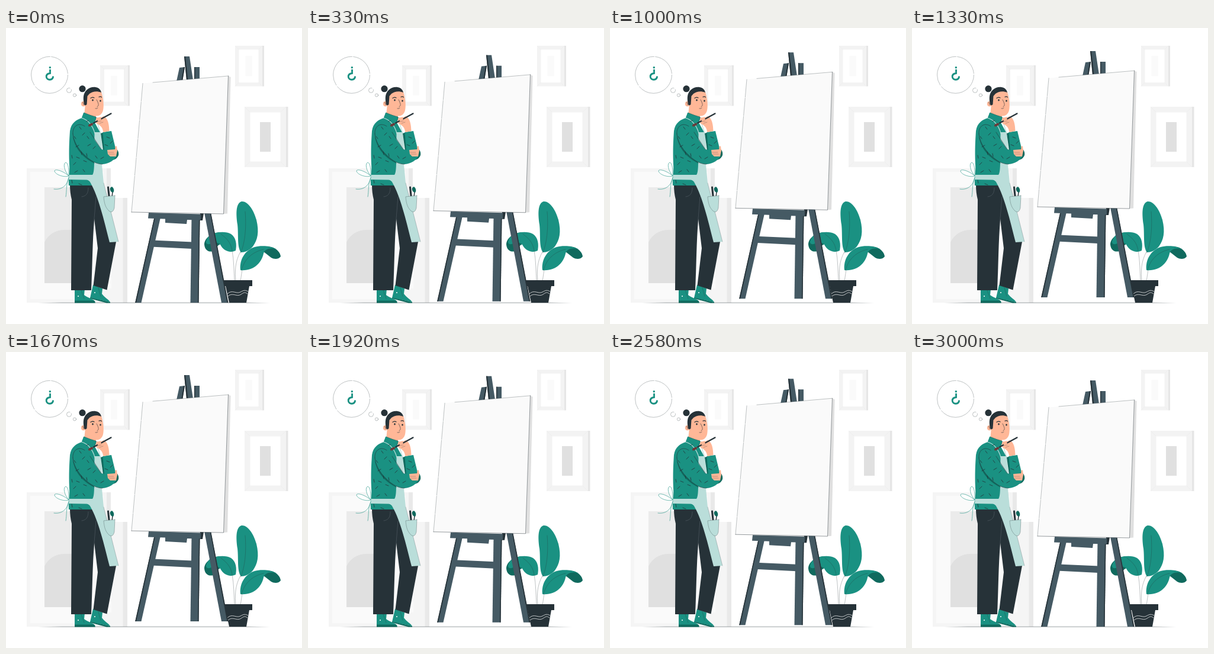
Animation, 500 px wide and 500 px high, one loop 3040 ms. Source, as an HTML page:

```html
<!DOCTYPE html>
<html lang="en">
<head>
<meta charset="utf-8">
<title>Artist at the easel</title>
<style>
html, body { margin: 0; width: 100%; height: 100%; overflow: hidden; background: #fff; }
svg { display: block; width: 100vw; height: 100vh; }
.teal { fill: #1a9182; }
.deep { fill: #106a5e; }
.ink { fill: #263238; }
.skin { fill: #ffb797; }
.mint { fill: #badeda; }
.slate { fill: #455a64; }
.line { fill: none; stroke: #263238; stroke-width: .6; stroke-linecap: round; stroke-linejoin: round; }
.faint { stroke-width: .5; stroke-opacity: .6; }
</style>
</head>
<body>
<svg viewBox="0 0 500 500">
  <g id="wall">
    <path fill="#f5f5f5" d="M35 237H171V464H35Z"/>
    <path fill="#e9e9e9" d="M170 237H177V464H170Z"/>
    <path fill="#fafafa" d="M41 243H165V458H41Z"/>
    <path fill="#ebebeb" d="M65 269H141V431H65Z"/>
    <path fill="#e0e0e0" d="M65 431V362C72 348 84 341 99 341H141V431Z"/>
    <path fill="#f5f5f5" d="M150 287H199V464H150Z"/>
    <path fill="#fafafa" d="M150 292H178V440H150Z"/>
    <path fill="#e9e9e9" d="M197.500 287H205V464H197.500Z"/>
  </g>

  <path fill="#263238" opacity=".6" d="M54 464.200L95 463.800H405L446 464.200L405 464.600H95Z"/>

  <g id="plant">
    <path class="line faint" d="M396 378C386 396 387 412 388 428M382 376C385 392 385 410 386 428M399 408L396 428"/>
    <path class="teal" d="M397 379C390 370 393 350 391 332C389 318 387 296 398 293C407 292 418 305 423 324C428 345 425 358 417 369C411 376 403 379 397 379Z"/>
    <path class="deep" d="M360 345C345 347 335 356 335 366C336 376 343 379 350 377C357 375 356 366 361 366Z"/>
    <path class="teal" d="M344 350C356 344 371 343 380 348C389 354 390 366 388 376C378 381 367 376 362 366C358 361 350 362 344 365C337 366 335 361 344 350Z"/>
    <path class="deep" d="M436 369C452 367 463 377 464 386C459 392 452 390 448 388L434 377Z"/>
    <path class="teal" d="M396 409C394 391 404 375 420 370C433 366 449 369 458 374C447 370 437 373 435 381C432 396 419 411 396 409Z"/>
    <path class="line faint" d="M404 310C407 346 401 371 396 380M363 348C377 358 381 367 382 377M435 374C416 378 402 391 398 409"/>
    <path class="ink" d="M367 426H416V436H367ZM371 436H411L406 464H377Z"/>
    <path fill="none" stroke="#fff" stroke-width=".7" d="M374 449C382 441 389 450 396 446S404 443 409 445M375 453C383 446 390 455 397 450S404 447 408 449"/>
  </g>

  <g id="easel">
    <g class="slate">
      <path d="M293 67L302 66L298 90H288ZM318 66H327V90H318Z"/>
      <path d="M301 48L310 48L316 88H305Z"/>
      <path d="M247 358.500L315 361.500V373L245 369.500Z"/>
      <path d="M250.500 320H261L228.500 464H218.200Z"/>
      <path d="M335 312H346L375 464H364Z"/>
      <path d="M313.500 320H327.500L325.500 464H311.500Z"/>
    </g>
    <g class="ink">
      <path d="M301 48H303L307.500 88H305ZM318 66H319.500V90H318ZM300 66.300L302 66L298 90H296Z"/>
      <path d="M250.500 320H252L220 464H218.200Z"/>
      <path d="M345 314H346.500L375.500 464H373.500Z"/>
      <path d="M326 320H327.500L325.500 464H324Z"/>
      <path d="M328 313H334L332 325H327Z"/>
    </g>
    <path class="slate" d="M241 312L329 314.500V324.500L306 324L305 331L269 329V322.500L240 321.500Z"/>
    <path fill="#e0e0e0" d="M375.500 81L379.500 83L374 313.500L367.500 314Z"/>
    <path fill="#fafafa" d="M231 93.500L375.500 81L367.500 314L212 311Z"/>
    <path class="line faint" d="M231 93.500L212 311" stroke-dasharray="30 1.500"/>
    <path class="line" d="M212 311L367.500 314L375.500 81" stroke-opacity=".8"/>
    <path class="line faint" d="M248 92L375.500 81"/>
  </g>

  <g id="thought">
    <circle class="line faint" cx="73.500" cy="79.300" r="31" stroke-dasharray="76 3 68 2 43 3"/>
    <circle class="line faint" cx="106.500" cy="105.300" r="4" stroke-dasharray="20 3"/>
    <circle class="line faint" cx="116" cy="113.500" r="2.600"/>
    <circle class="teal" cx="74.300" cy="66.700" r="1.700"/>
    <path fill="none" stroke="#1a9182" stroke-width="2.800" d="M74.500 70V76.500C70 77 68 79.500 68.200 82.500C68.800 89 79 89 79.700 81.500"/>
  </g>

  <g id="artist">
    <g id="legs">
      <path class="teal" d="M147 434L163 440L162 449C166 455 173 458 176 463L142 456Z"/>
      <path class="deep" d="M142 455.500L176 463V464.500H170L142 457Z"/>
      <path class="teal" d="M116 441H133L132 451C138 456 148 457 151 463H116Z"/>
      <path class="deep" d="M116 460.500L149 460.500L151 464.500H116Z"/>
      <path fill="none" stroke="#fff" stroke-width="2" stroke-linecap="round" d="M122 453v.1M150 447v.1"/>
      <path class="line faint" d="M127 443L132 457M156 439L160 453"/>
      <path class="ink" d="M145 270L166 290L186 361L170.500 442.500L147.500 435L155 372L149 322Z"/>
      <path class="ink" d="M108 265H148C153 285 152 300 149 325C146 360 146 400 144 443H110L111 290C109 282 108 274 108 265Z"/>
      <path class="line" style="stroke:#6a757b;stroke-width:.4" d="M139 270C139 280 135 284 128 285M152 285L148 335"/>
    </g>

    <g id="torso">
      <path class="skin" d="M134 128L152 137V155L132 148Z"/>
      <path class="teal" d="M131 143L153 151L150 160L160 178L160 247L147 252L145 266H106C105 252 108 245 107 230C106 205 107 190 108 174C110 160 119 155 128 152Z"/>
      <path class="mint" d="M149.500 176H160L164 220L162 231L165 262L190 361L175 362C165 322 156 285 143 262Q141 257 136 256.500L106 256V248H146Q149 245 149 225Z"/>
      <path class="line" style="stroke:#badeda;stroke-width:1.200" d="M128 152C139 155 147 166 150 178M153 156L160 178"/>
      <path class="line" stroke-opacity=".4" d="M165 262L190 361"/>
    </g>

    <g class="line" style="stroke:#1a9182">
      <path fill="#fff" d="M106 250C97 253 82 247 82 241C84 237 99 243 106 250C98 240 96 229 101 227C106 229 106 240 106 250"/>
      <path d="M106 252C104 266 94 274 81 272M106 253C101 265 103 275 101 285"/>
    </g>

    <g id="pocket">
      <path class="line" style="stroke-width:3" d="M172.500 269L174 283"/>
      <path class="line" style="stroke-width:1.500" d="M180 277L179 285"/>
      <path class="deep" d="M178 277C174 272 176 269 179 268C183 271 183 276 181 278Z"/>
      <path class="mint" d="M165 285L184 283L183 304C181 311 178 312 174 309C168 303 166 297 165 285Z"/>
      <path class="line faint" d="M184 283L165 285C166 297 168 303 174 309C178 312 181 311 183 304L184 283"/>
    </g>

    <g id="arms">
      <path class="deep" d="M160 178L166 176L174 207L164 207Z"/>
      <path class="teal" d="M163.500 176L178 174L184.500 201L187 212L180 222L166 207Z"/>
      <path class="deep" d="M184 203C189 205 191 210 190 215C188 220 184 223 178 223Z"/>
      <path class="deep" d="M113 184C116 201 127 218 150 229L145 223Z"/>
      <path class="teal" d="M113 177C114 163 128 159 137 171L161 205L173 207L175 216H187C182 224 174 229 164 230C150 230 140 222 131 213C120 202 113 189 113 177Z"/>
      <path class="line" d="M142 176L161 205M113 179C112 165 123 159 133 166M113 179C114 191 121 203 131 213C143 225 153 230 163 230"/>
      <path class="skin" d="M171 206L184 205L185 199L187 200L188 207L186 217L176 217L172 213Z"/>
      <path class="line faint" d="M173 210H182M174 213H183"/>
    </g>

    <path id="flecks" class="line" style="stroke-width:.8"/>

    <g id="head">
      <circle class="ink" cx="129" cy="102.700" r="5.600"/>
      <path class="skin" d="M136 111C144 104 156 104 161 108C164 117 166 130 164 139C162 147 156 150 149 148L136 140L134 131C129 135 126 130 127 127C128 123 132 123 135 126Z"/>
      <path class="ink" d="M132 129C130 119 130 111 136 105C143 98 156 98 160 106L161 109C154 106 146 107 141 111L137.500 115L136.500 129C135 131 133 131 132 129Z"/>
      <path class="line" style="stroke-width:1.200" d="M143 118.500Q146 116 149 118M157 116.500Q160 115 161.500 117"/>
      <path class="line" d="M153 121C156 127 158 131 154 133M151 136Q153 137 155 135M129 126Q132 126 131 130"/>
      <ellipse class="ink" cx="146.500" cy="121.800" rx="1.300" ry="1.600"/>
      <ellipse class="ink" cx="159.500" cy="123" rx="1.300" ry="1.600"/>
      <path class="teal" d="M132 143Q143 148 152 150L150 160L128 151Z"/>
      <path class="line faint" d="M132 143Q143 148 152 150L150 160"/>
    </g>

    <g id="hand">
      <path class="skin" d="M153 151L159 152L165 149L169 152C173 157 174 164 174.500 174L164.500 176C163 169 161 165 154 162L151 159Z"/>
      <path class="line" style="stroke-width:2.200" d="M148 160.500L177.500 144.500"/>
      <path class="line" style="stroke:#6b3a3a;stroke-width:4" d="M141 164.500L145 162.500"/>
      <path class="skin" d="M154 152L160 150L161 157L155 158Z"/>
      <path class="line faint" d="M155 158L161 157M158 161L164 159"/>
    </g>
  </g>
</svg>
<script>
const FRAME = 1000 / 24, LOOP = 3040, CYCLE = 3000, RISE = 10;
const byId = id => document.getElementById(id);

function pictureFrame(x, y, w, h, rim, side, innerW, innerH, shade) {
  const rect = (cx, cy, rw, rh, fill) =>
    `<rect x="${cx - rw / 2}" y="${cy - rh / 2}" width="${rw}" height="${rh}" fill="${fill}"/>`;
  const face = w - side, cx = x + face / 2, cy = y + h / 2;
  return rect(cx, cy, face, h, '#f3f3f3')
    + rect(x + w - side / 2, cy, side, h, '#e6e6e6')
    + `<path d="M${x} ${y}l${rim} ${rim}M${x + face} ${y}l${-rim} ${rim}M${x} ${y + h}l${rim} ${-rim}M${x + face} ${y + h}l${-rim} ${-rim}" stroke="#ebebeb" stroke-width=".6"/>`
    + rect(cx, cy, face - 2 * rim, h - 2 * rim, '#fff')
    + rect(cx, cy, innerW, innerH, shade);
}
byId('wall').innerHTML +=
  pictureFrame(387, 30, 49, 68.500, 6.500, 3, 11, 34, '#fafafa') +
  pictureFrame(159, 63, 50, 68.500, 7, 3, 11, 33, '#fafafa') +
  pictureFrame(403, 133, 73.500, 102, 9.500, 3.500, 18, 50, '#e0e0e0');

// Sweater flecks: start points, with slants alternating by index.
const flecks = [[115, 183], [118, 201], [111, 215], [119, 218], [129, 181], [137, 183],
  [138, 199], [127, 209], [131, 224], [114, 231], [130, 239], [116, 244], [111, 257],
  [123, 263], [147, 204], [151, 216], [160, 221], [136, 212], [170, 184], [176, 195],
  [124, 167], [136, 158], [141, 151], [167, 197]];
const slants = [[3, 4], [5, -3], [1, 5], [5, 2], [4, -4]];
byId('flecks').setAttribute('d', flecks.map(([x, y], i) =>
  `M${x} ${y}l${slants[i % slants.length]}`).join(''));

function draw(ms) {
  const t = Math.min(CYCLE, Math.floor((ms % LOOP + 4.9) / FRAME) * FRAME);
  const lift = RISE * (1 - Math.abs(1 - 2 * t / CYCLE));
  byId('easel').setAttribute('transform', `translate(0 ${-lift.toFixed(3)})`);
}

const start = performance.now();
function tick() {
  draw(performance.now() - start);
  requestAnimationFrame(tick);
}
draw(0);
requestAnimationFrame(tick);
</script>
</body>
</html>
```
